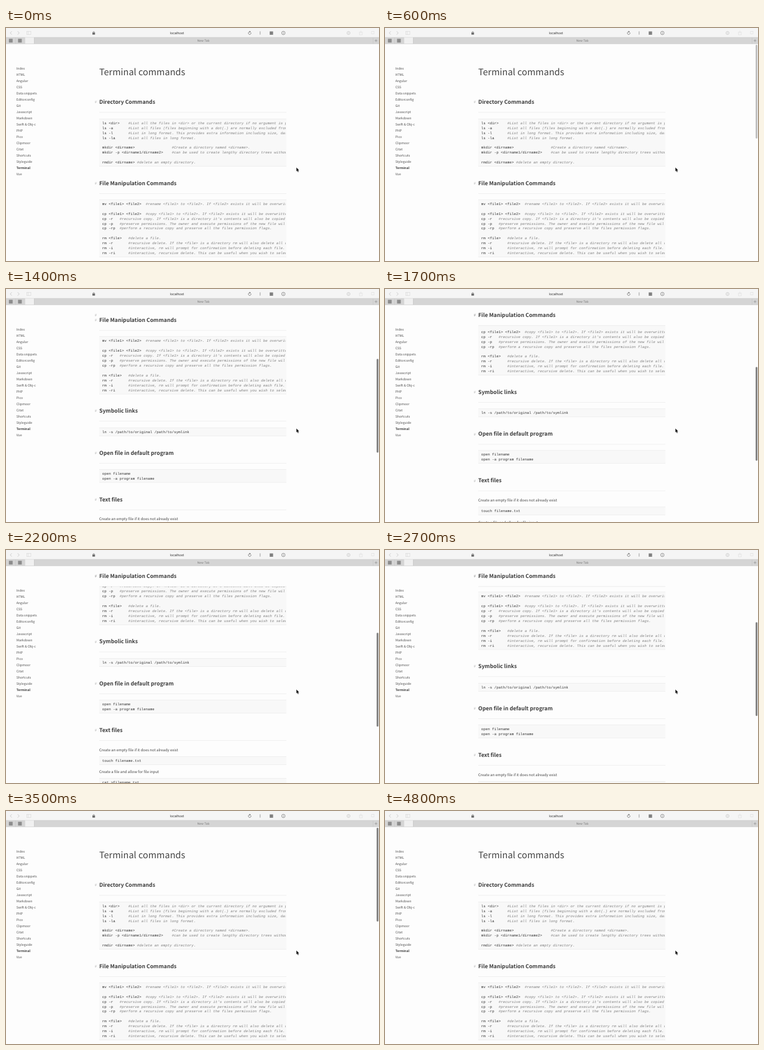
Animation, 600 px wide and 375 px high, one loop 4.9 s. Source, as an HTML page with a canvas:

```html
<!DOCTYPE html>
<html lang="en">
<head>
<meta charset="utf-8">
<title>Terminal commands</title>
<style>
html, body { margin: 0; width: 100%; height: 100%; overflow: hidden; background: #fdfdfd; }
canvas { display: block; width: 100vw; height: 100vh; }
</style>
</head>
<body>
<canvas id="stage"></canvas>
<script>
const W = 600, H = 375, LOOP = 4900, STEP = 100;
const SANS = '"Noto Sans CJK JP", "Noto Sans CJK SC", "Source Sans Pro", "Noto Sans", sans-serif';
const MONO = '"Liberation Mono", "Courier New", monospace';
const UI = 'Inter, Roboto, sans-serif';
const PAGE = '#fdfdfd', LEFT = 150, RIGHT = 451, STICKY = 42, LINE = 7.93;

const menu = ['Index', 'HTML', 'Angular', 'CSS', 'Data snippets', 'Editorconfig', 'Git',
  'Javascript', 'Markdown', 'Swift & Obj-c', 'PHP', 'Pico', 'Clipmoor', 'Citat',
  'Shortcuts', 'Styleguide', 'Terminal', 'Vue'];

const headings = [
  [119, 'Directory Commands'],
  [249.5, 'File Manipulation Commands'],
  [395.5, 'Symbolic links'],
  [463, 'Open file in default program'],
  [538, 'Text files']
];

const notes = [
  [570, 'Create an empty file if it does not already exist'],
  [605.5, 'Create a file and allow for file input']
];

// Each block: centre of its first line, then the lines.
const blocks = [
  [153, `ls <dir>    #List all the files in <dir> or the current directory if no argument is passed.
ls -a       #List all files (files beginning with a dot(.) are normally excluded from the list).
ls -l       #List in long format. This provides extra information including size, date.
ls -la      #List all files in long format.

mkdir <dirname>                 #Create a directory named <dirname>.
mkdir -p <dirname1/dirname2>    #can be used to create lengthy directory trees without errors.

rmdir <dirname> #delete an empty directory.`],
  [283, `mv <file1> <file2>  #rename <file1> to <file2>. If <file2> exists it will be overwritten.

cp <file1> <file2>  #copy <file1> to <file2>. If <file2> exists it will be overwritten.
cp -r   #recursive copy. If <file1> is a directory it's contents will also be copied.
cp -p   #preserve permissions. The owner and execute permissions of the new file will match.
cp -rp  #perform a recursive copy and preserve all the files permission flags.

rm <file>   #delete a file.
rm -r       #recursive delete. If the <file> is a directory rm will also delete all contents.
rm -i       #interactive, rm will prompt for confirmation before deleting each file.
rm -ri      #interactive, recursive delete. This can be useful when you wish to selectively delete.`],
  [429.5, 'ln -s /path/to/original /path/to/symlink'],
  [496.5, 'open filename\nopen -a program filename'],
  [587.5, 'touch filename.txt'],
  [622.5, 'cat >filename.txt']
].map(([y, code]) => ({ y, lines: code.split('\n') }));

const canvas = document.getElementById('stage');
const ctx = canvas.getContext('2d');

function resize() {
  const dpr = window.devicePixelRatio || 1;
  canvas.width = Math.round(innerWidth * dpr);
  canvas.height = Math.round(innerHeight * dpr);
}

const clamp = v => Math.min(1, Math.max(0, v));
const progress = (t, from, to) => clamp((t - from) / (to - from));

function scrollAt(t) {
  const down = 1 - (1 - progress(t, 606, 2520)) ** 3;
  const p = progress(t, 2430, 3480);
  return 249.5 * down * (1 - p * p * (3 - 2 * p));
}

function rect(x, y, w, h, color) {
  ctx.fillStyle = color;
  ctx.fillRect(x, y, w, h);
}

// Set large and scaled down, so that small sizes keep fractional advances.
function text(str, x, y, size, color, { font = SANS, style = '', align = 'left' } = {}) {
  ctx.save();
  ctx.translate(x, y);
  ctx.scale(0.1, 0.1);
  ctx.font = `${style} ${size * 10}px ${font}`;
  ctx.textRendering = 'geometricPrecision';
  ctx.textAlign = align;
  ctx.fillStyle = color;
  ctx.fillText(str, 0, 0);
  ctx.restore();
}

function stroke(points, color, width = 0.8) {
  ctx.beginPath();
  points.forEach(([x, y], i) => i ? ctx.lineTo(x, y) : ctx.moveTo(x, y));
  ctx.strokeStyle = color;
  ctx.lineWidth = width;
  ctx.stroke();
}

function arc(x, y, r, color, width = 0.7, from = 0, to = Math.PI * 2) {
  ctx.beginPath();
  ctx.arc(x, y, r, from, to);
  ctx.strokeStyle = color;
  ctx.lineWidth = width;
  ctx.stroke();
}

function drawBlock({ y, lines }, scroll) {
  const top = y - scroll - 7;
  const height = (lines.length - 1) * LINE + 13.5;
  if (top > H || top + height < 0) return;
  rect(LEFT, top, RIGHT - LEFT, height, '#f8f8f8');
  rect(LEFT, top, RIGHT - LEFT, 0.5, '#e4e4e4');
  rect(LEFT, top + height - 0.5, RIGHT - LEFT, 0.5, '#e4e4e4');
  ctx.save();
  ctx.beginPath();
  ctx.rect(LEFT, top, 300, height);
  ctx.clip();
  lines.forEach((line, i) => {
    const base = y - scroll + i * LINE + 1.8;
    const cut = line.indexOf('#');
    const code = cut < 0 ? line : line.slice(0, cut);
    text(code, 154.7, base, 5.833, '#333', { font: MONO });
    if (cut >= 0) {
      text(line.slice(cut), 154.7 + cut * 3.5, base, 5.833, '#808080', { font: MONO, style: 'italic' });
    }
  });
  ctx.restore();
}

function drawHeading([home, label], scroll) {
  const y = Math.max(home - scroll, STICKY);
  rect(LEFT, y - 16, RIGHT - LEFT, 33, PAGE);
  rect(LEFT, y + 16.6, RIGHT - LEFT, 0.5, '#e2e2e2');
  text('#', 142.7, y + 2.4, 5.9, '#bbb');
  text(label, LEFT, y + 3.3, 8.65, '#3c3c3c', { style: '600' });
}

function drawMenu() {
  menu.forEach((item, i) => {
    const here = item === 'Terminal';
    text(item, 16.7, 66.9 + i * 10, here ? 5.1 : 5.2, here ? '#333' : '#4c4c4c', { style: here ? '600' : '' });
  });
}

function drawToolbar() {
  rect(0, 0, W, 15, '#f5f5f5');
  const pale = '#c4c4c4', dark = '#666';
  stroke([[9.3, 5.3], [6.8, 8], [9.3, 10.7]], pale);
  stroke([[18.8, 5.3], [21.3, 8], [18.8, 10.7]], pale);
  ctx.strokeStyle = '#d6d6d6';
  ctx.lineWidth = 0.6;
  ctx.strokeRect(33.5, 5.5, 6.5, 5);
  stroke([[35.8, 5.5], [35.8, 10.5]], '#d6d6d6', 0.6);

  rect(139, 7.4, 4.2, 3.2, dark);
  arc(141.1, 7.3, 1.4, dark, 0.7, Math.PI, 0);
  text('localhost', 275, 10, 5.2, '#222', { font: UI, align: 'center' });
  arc(392, 8.2, 2.2, dark, 0.7, -0.4, 4.6);
  ctx.beginPath();
  ctx.moveTo(391.7, 4.6);
  ctx.lineTo(393.8, 6);
  ctx.lineTo(391.7, 7.4);
  ctx.fillStyle = dark;
  ctx.fill();
  stroke([[408.8, 5.4], [408.8, 10.6]], '#888', 0.8);
  rect(424.2, 5.5, 5.4, 5.4, '#808080');
  arc(446.2, 8, 2.8, dark, 0.6);
  stroke([[446.2, 7.4], [446.2, 9.7]], dark, 0.6);
  rect(445.9, 6, 0.6, 0.7, dark);

  arc(551, 8, 2.5, pale);
  stroke([[551, 6.6], [551, 9.4]], pale, 0.6);
  ctx.strokeStyle = '#ddd';
  ctx.lineWidth = 0.6;
  ctx.strokeRect(568.7, 6.5, 4.4, 4.5);
  stroke([[570.9, 8.6], [570.9, 4.2]], '#ddd', 0.6);
  ctx.strokeRect(588, 5.6, 4, 4);

  rect(0, 15, W, 10.5, '#d5d5d5');
  rect(0, 14.8, W, 0.5, '#c6c6c6');
  rect(0, 25.2, W, 0.5, '#c4c4c4');
  rect(30, 15.3, 15, 9.9, '#f0f0f0');
  for (const x of [15, 30, 45, 590]) rect(x, 15.3, 0.5, 9.9, '#c2c2c2');
  rect(4.7, 17.4, 6, 6, '#8c8c8c');
  rect(19.4, 17.4, 6, 6, '#8c8c8c');
  text('New Tab', 317.5, 22, 4.7, '#777', { font: UI, align: 'center' });
  stroke([[593, 20.3], [597.4, 20.3]], '#888', 0.6);
  stroke([[595.2, 18.1], [595.2, 22.5]], '#888', 0.6);
}

function drawScrollbar(t, scroll) {
  const alpha = progress(t, 590, 610) * (1 - progress(t, 4150, 4450));
  if (!alpha) return;
  ctx.globalAlpha = alpha;
  ctx.beginPath();
  ctx.roundRect(596.2, 27 + scroll * 0.428, 2.9, 151, 1.4);
  ctx.fillStyle = '#808080';
  ctx.fill();
  ctx.globalAlpha = 1;
}

function drawCursor() {
  const shape = [[0, 0], [0, 6.2], [1.4, 5], [2.4, 7.3], [3.4, 6.8], [2.5, 4.7], [4.4, 4.6]];
  ctx.beginPath();
  shape.forEach(([x, y]) => ctx.lineTo(467.2 + x, 224.6 + y));
  ctx.closePath();
  ctx.strokeStyle = '#fff';
  ctx.lineWidth = 1;
  ctx.stroke();
  ctx.fillStyle = '#111';
  ctx.fill();
}

function draw(t) {
  const scroll = scrollAt(t);
  ctx.setTransform(canvas.width / W, 0, 0, canvas.height / H, 0, 0);
  rect(0, 0, W, H, PAGE);
  text('Terminal commands', LEFT, 76.4 - scroll, 14.47, '#444');
  blocks.forEach(block => drawBlock(block, scroll));
  notes.forEach(([y, label]) => text(label, LEFT, y - scroll + 2, 5.95, '#444'));
  headings.forEach(heading => drawHeading(heading, scroll));
  drawMenu();
  drawToolbar();
  drawScrollbar(t, scroll);
  drawCursor();
}

const start = performance.now();
function tick() {
  const t = (performance.now() - start) % LOOP;
  draw(Math.floor(t / STEP) * STEP);
  requestAnimationFrame(tick);
}

addEventListener('resize', resize);
resize();
tick();
</script>
</body>
</html>
```
